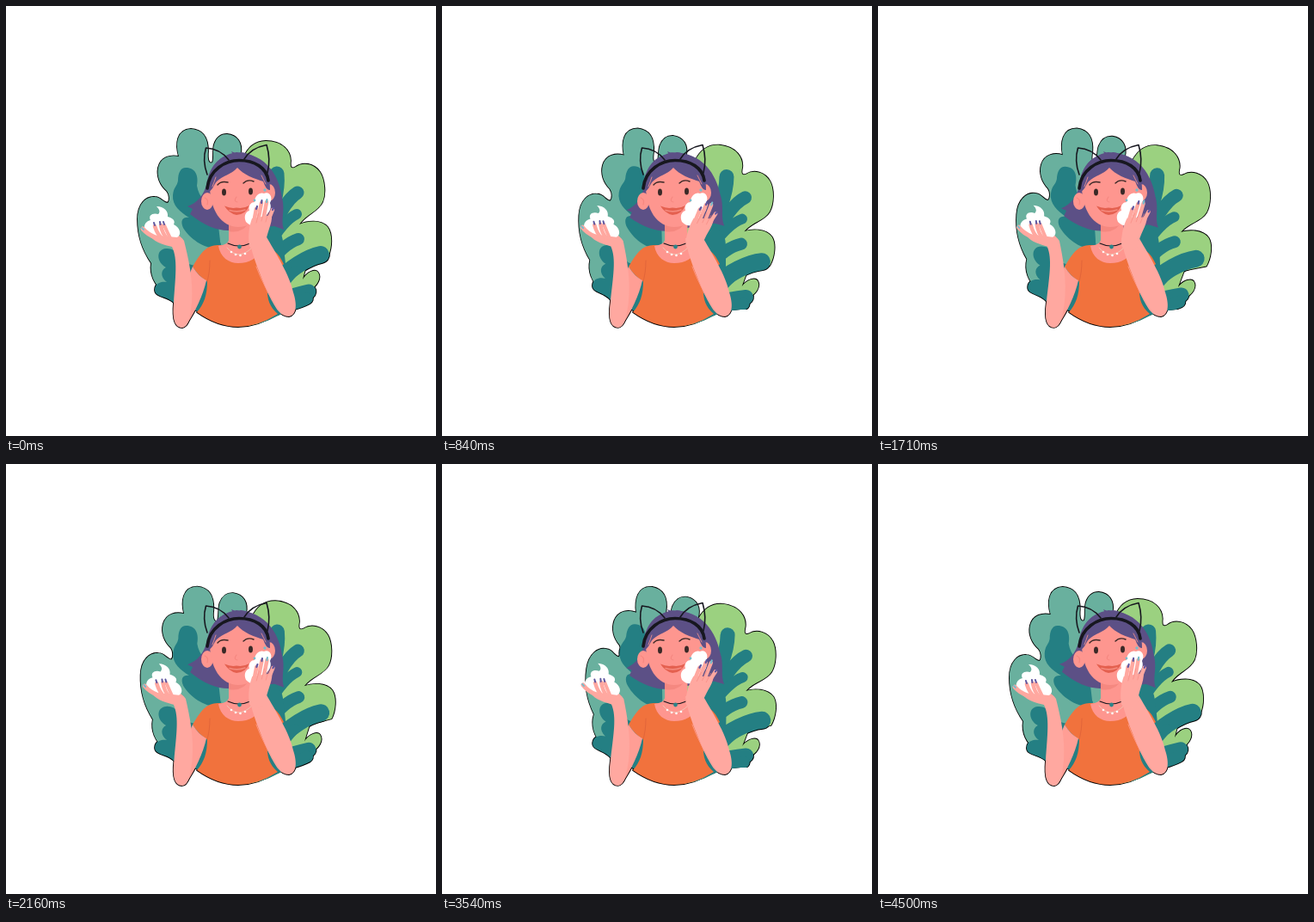
An HTML page with a canvas for the animation above (4560 ms loop, 500 by 500 pixels).

```html
<!DOCTYPE html>
<html lang="en">
<head>
<meta charset="utf-8">
<style>
html, body { margin: 0; width: 100%; height: 100%; overflow: hidden; background: #fff; }
canvas { display: block; width: 500px; height: 500px; }
</style>
</head>
<body>
<canvas id="stage" width="500" height="500"></canvas>
<script>
const ctx = document.getElementById('stage').getContext('2d');
const LOOP = 4560, STEP = 30;
const C = {
  sage: '#69b09e', lime: '#9bd180', teal: '#247f83', hair: '#5c5086', band: '#17171f',
  skin: '#fe968f', arm: '#ffa8a0', under: '#ff9e95', shade: '#f58880', shirt: '#f1723d',
  fold: '#e2653a', lip: '#e4604f', eye: '#3a2927', gem: '#2b8489', nail: '#5f57a0', aqua: '#79bccb'
};

// Periodic smooth curve through [time, value] knots.
function curve(knots) {
  const n = knots.length;
  const at = i => {
    const k = knots[(i + n) % n];
    return [k[0] + LOOP * Math.floor(i / n), k[1]];
  };
  const slope = i => {
    const a = at(i - 1), b = at(i + 1);
    return (b[1] - a[1]) / (b[0] - a[0]);
  };
  return t => {
    let i = n - 1;
    while (knots[i][0] > t) i--;
    const [t0, a] = at(i), [t1, b] = at(i + 1);
    const d = t1 - t0, u = (t - t0) / d, v = 1 - u;
    return v * v * ((1 + 2 * u) * a + u * d * slope(i)) +
           u * u * ((3 - 2 * u) * b - v * d * slope(i + 1));
  };
}

const sway = {
  sage: curve([[0, 0], [480, .25], [1110, .58], [1320, .71], [1650, .6], [2160, .25],
    [2400, .13], [2910, .56], [3450, 1], [3600, .97], [4320, .07]]),
  lime: curve([[0, 0], [480, .33], [1080, .95], [1200, 1], [1650, .8], [2160, .38],
    [2400, .27], [2910, .6], [3390, .93], [3540, .84], [3810, .57], [4350, .06]]),
  teal: curve([[0, 0], [480, .4], [1080, 1], [1260, .92], [2160, .02], [2250, .02],
    [2910, .95], [3200, 1], [3540, .84], [4400, .02]]),
  hand: curve([[0, 0], [480, .75], [1000, 1], [1260, .97], [2160, .04], [2250, .04],
    [2910, .95], [3200, 1], [3540, .92], [4400, .02]])
};

const shape = (color, d) => ({ color, path: new Path2D(d) });
const line = (color, width, d) => ({ color, width, path: new Path2D(d) });
const dot = (color, x, y, rx, ry = rx) =>
  shape(color, `M${x - rx} ${y}a${rx} ${ry} 0 1 0 ${2 * rx} 0a${rx} ${ry} 0 1 0 ${-2 * rx} 0Z`);

const sageLeaf = [shape(C.sage,
  `M185 332C172 326 167 311 169 299C158 283 153 267 153 248C153 230 163 221 173 222
  C180 222 182 228 188 229C191 226 190 219 187 215C179 208 175 198 177 188
  C180 175 192 173 201 175C197 161 198 144 215 143C232 144 235 157 235 169
  C234 179 236 184 240 182C242 177 240 167 242 161C245 152 250 149 257 149
  C269 150 275 159 273 172C269 230 265 290 260 365L215 350Z`)];

const limeLeaf = [shape(C.lime,
  `M268 230C270 185 276 158 302 157C322 157 331 169 331 180C330 188 332 190 337 187
  C345 181 358 183 365 193C371 202 372 219 368 228C363 239 349 242 341 254
  C350 250 366 248 374 257C380 265 379 281 375 290L350 298L345 318
  C350 309 360 305 363 310C367 316 362 325 355 329C345 337 332 350 300 374L268 375Z`)];

const tealLeft = [
  shape(C.teal,
    `M209 188C221 188 224 198 222 209C224 222 234 232 245 238L250 282
    C232 284 214 271 206 258C202 249 206 245 213 246C203 240 193 232 194 220
    C195 210 199 210 200 203C200 194 203 188 209 188Z`),
  shape(C.teal,
    `M250 275L250 365L195 345C187 337 173 339 173 330C173 322 181 320 187 321
    C179 315 180 307 186 304C175 298 174 283 186 282C198 281 203 292 212 300L232 305Z`)
];
const tealRight = [
  line(C.teal, 17, 'M315 195Q318 225 295 270'),
  line(C.teal, 15, 'M339 217Q321 228 305 275'),
  line(C.teal, 12, 'M338 242Q323 249 305 280'),
  line(C.teal, 14, 'M340 271Q322 277 307 300'),
  line(C.teal, 20, 'M366 289Q342 294 310 325'),
  line(C.teal, 12, 'M336 308Q328 314 315 335'),
  line(C.teal, 17, 'M352 332Q335 336 305 345'),
  line(C.teal, 14, 'M350 340Q335 348 305 352'),
  line(C.teal, 44, 'M300 275Q306 320 305 350')
];

const backHair = [shape(C.hair,
  `M268 170C245 174 236 190 234 205C230 221 222 229 211 233L217 236L214 242
  C230 255 245 261 258 261L312 256L323 260C319 248 325 238 321 223
  C318 200 305 172 268 170Z`)];

const body = [
  shape(C.shirt,
    `M246 278C234 279 229 283 217 303C222 311 227 316 234 320C234 336 230 347 222 356
    Q268 389 316 358C307 350 303 342 304 326L314 308L323 300C317 287 309 280 295 278Z`),
  line(C.fold, 1, 'M237 296Q237 310 234 320'),
  shape(C.skin,
    `M259 246L259 272C258 277 252 278 247 279C249 292 259 299 270 299C283 299 294 293 297 281
    C289 278 285 277 285 272L286 242Z`),
  shape(C.shade, 'M259 254Q273 260 284 250Q276 265 259 262Z'),
  line(C.band, 1.2, 'M258 276Q271 282 284 276'),
  dot(C.gem, 271.5, 280, 2.4),
  line('#e9d5c0', .7, 'M257 281Q270 297 286 281'),
  ...[[262, 286], [267, 289], [272.5, 290], [278, 288]].map(p => dot('#fff', ...p, 1.3))
];

const upperArm = [shape(C.under, 'M217 303C222 311 227 316 233 319C229 337 220 355 211 369L204 362L210 320Z')];
const forearm = [
  shape(C.arm,
    `M168 268C174 276 186 278 193 280C200 294 197 315 195 345C193 366 197 374 205 374
    C213 373 214 361 216 345C218 318 212 293 207 273C201 264 188 260 176 262Z`)
];
const palmFoam = [
  shape('#fff',
    `M166 266C158 260 160 251 168 249C165 243 171 240 177 242C180 239 178 236 175 233
    C184 233 189 239 188 245C195 247 197 250 195 254C202 257 205 266 199 269Z`),
  line(C.arm, 5, 'M174 269Q165 266 159 259'),
  line(C.arm, 4.5, 'M183 272Q176 266 173 256'),
  line(C.arm, 4.5, 'M187 270Q182 265 180 255'),
  line(C.arm, 4, 'M191 270Q188 264 184 255'),
  line(C.nail, 2, 'M173 255L172 252M179.5 254L179 251M184 254L183 251'),
  line(C.aqua, 2, 'M160 260L158 258')
];

const face = [
  dot(C.skin, 234, 227, 7, 10),
  dot(C.skin, 306, 217, 7, 10),
  line(C.shade, 1.2, 'M231 223Q236 225 234 231'),
  shape(C.skin,
    `M237 205C238 190 252 182 270 182C291 182 303 195 304 212C305 236 291 257 270 257
    C251 257 236 238 237 205Z`),
  dot(C.eye, 253.5, 216.5, 2.5, 3.9),
  dot(C.eye, 284.5, 215.5, 2.5, 3.9),
  line(C.eye, 1.4, 'M246 208Q250 203 258 205M276 206Q281 201 288 204'),
  line(C.shade, 1.2, 'M268 222Q264 227 269 228'),
  shape(C.lip, 'M254 232.5Q262 236 268 234.5Q276 236 283 232Q278 243 268 243Q259 241 254 232.5Z'),
  line('#f4897d', 1.6, 'M260 237.5Q269 240.5 278 237')
];

const fringe = [
  shape(C.hair,
    `M234 214C234 185 252 172 264 173L262 169L269 172L273 170C293 172 308 190 307 214
    C303 214 301 209 299 204C289 201 276 196 269 188C262 196 252 197 245 204
    C242 207 241 213 236 216Z`),
  line(C.skin, .8, 'M244 199Q242 205 240 210M297 197Q300 203 302 207')
];
const headband = [
  line(C.band, 3.7, 'M234 212C236 190 256 179.5 271 179.5C289 179.5 303 188 305 203'),
  line(C.band, 1.6, 'M234 196Q228 180 232.5 165Q249 166 259 179'),
  line(C.band, 1.6, 'M277 178Q285 165 303 161.5Q308 178 304 194')
];

const cheekFoam = [shape('#fff',
  `M279 251C276 244 279 239 283 238C281 231 286 228 289 228C289 220 296 216 300 218
  C306 215 311 222 307 229C310 237 304 241 301 246C299 256 286 259 279 251Z`)];
const rightArm = [
  shape(C.arm,
    `M283 270C286 292 296 312 304 333C313 350 318 361 329 361C339 359 338 345 334 333
    C330 313 314 288 302 267Z`),
  line(C.under, .8, 'M291 303Q299 325 317 354')
];
const rightHand = [
  shape(C.arm, 'M283 279C281 267 283 255 286 247L309 243C310 254 302 264 302 279C296 286 286 286 283 279Z'),
  line(C.arm, 4.5, 'M288 252L291 236'),
  line(C.arm, 4.5, 'M293 250L297 229'),
  line(C.arm, 4.5, 'M299 250L303 228'),
  line(C.arm, 4.5, 'M304 252L310 237'),
  line(C.shade, .6, 'M291 252L294 241M297 250L300 238M302 251L305 240'),
  line(C.nail, 2.2, 'M291 236L292 233M297 229L297.5 226M310 237L311 235'),
  line(C.aqua, 2.2, 'M303 228L303.5 225')
];
const bubbles = [dot(C.aqua, 301, 214, 1.7), dot(C.aqua, 289, 226, 1.4)];

const clip = new Path2D('M0 0H500V353H352C340 353 326 355 316 360Q268 387 221 355L180 356H0Z');

// [shapes, motion, degrees, pivot x, pivot y]
const leaves = [
  [sageLeaf, 'sage', 8, 230, 350],
  [limeLeaf, 'lime', 8.6, 268, 356],
  [tealLeft, 'teal', 6.5, 235, 350],
  [tealRight, 'teal', 7.6, 290, 350]
];
const figure = [
  [backHair, 'hand', -4.5, 270, 188],
  [body],
  [upperArm],
  [forearm, 'lime', 3.2, 206, 365],
  [palmFoam, 'lime', 3.2, 206, 365],
  [face],
  [fringe],
  [headband],
  [cheekFoam],
  [rightArm],
  [rightHand, 'hand', 12, 291, 280],
  [bubbles]
];
const edged = [[[body[0]]], figure[2], figure[3], [[rightArm[0]]]];
const EDGE = 1.8;

function paint({ color, width, path }, edge) {
  ctx.fillStyle = ctx.strokeStyle = edge ? '#000' : color;
  if (width || edge) {
    ctx.lineWidth = (width || 0) + (edge || 0);
    ctx.stroke(path);
  }
  if (!width && !edge) ctx.fill(path);
}

function drawPart([shapes, motion, deg, x, y], t, edge) {
  ctx.save();
  if (motion) {
    ctx.translate(x, y);
    ctx.rotate(sway[motion](t) * deg * Math.PI / 180);
    ctx.translate(-x, -y);
  }
  shapes.forEach(s => paint(s, edge));
  ctx.restore();
}

function drawLeaves(t, edge) {
  ctx.save();
  ctx.clip(clip);
  leaves.forEach(p => drawPart(p, t, edge));
  ctx.restore();
}

function draw(t) {
  ctx.fillStyle = '#fff';
  ctx.fillRect(0, 0, 500, 500);
  ctx.lineCap = ctx.lineJoin = 'round';
  drawLeaves(t, EDGE);
  edged.forEach(p => drawPart(p, t, EDGE));
  drawLeaves(t);
  figure.forEach(p => drawPart(p, t));
}

const start = performance.now();
function tick(now) {
  const t = Math.max(0, now - start) % LOOP;
  draw(Math.min(Math.floor(t / STEP) * STEP, LOOP - 2 * STEP));
  requestAnimationFrame(tick);
}
tick(start);
</script>
</body>
</html>
```
